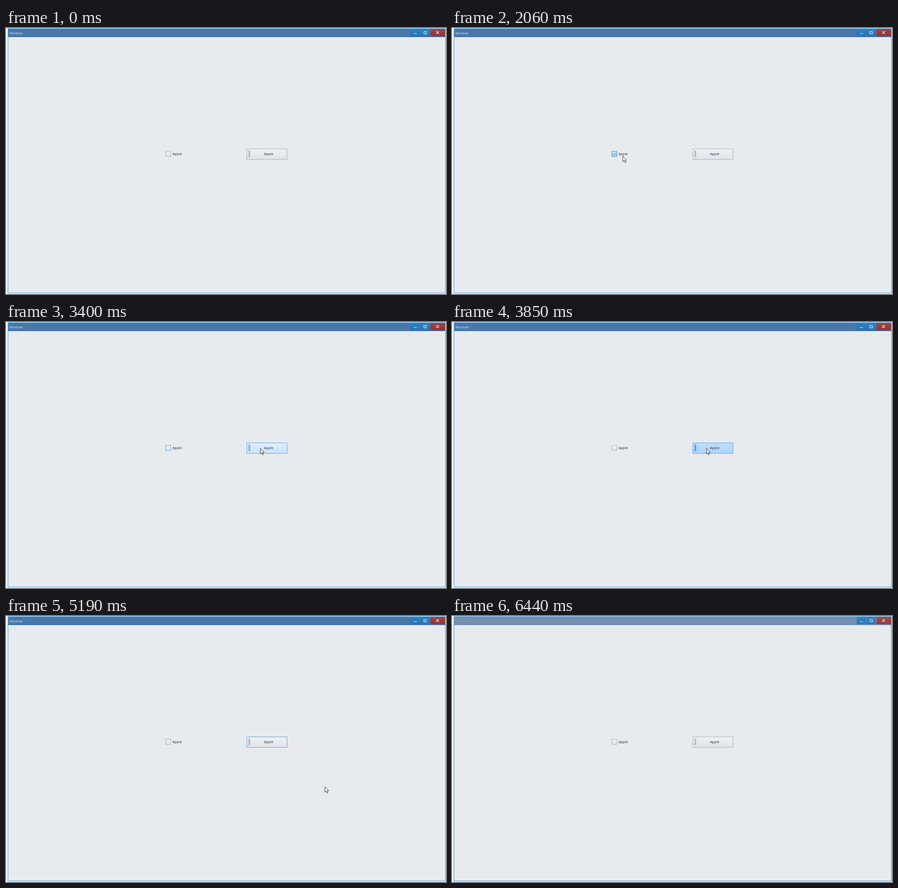
An HTML page that plays this animation: 962x582 px, repeating every 6520 ms.

```html
<!DOCTYPE html>
<html lang="en">
<head>
<meta charset="utf-8">
<title>Window</title>
<style>
  html, body { margin: 0; width: 100%; height: 100%; overflow: hidden; background: #fff; }
  svg { display: block; width: 100vw; height: 100vh; }
  text { font: 7.7px "Open Sans", "Noto Sans", sans-serif; fill: #1f2340; }
</style>
</head>
<body>
<svg viewBox="0 0 962 582" preserveAspectRatio="none">
  <defs>
    <linearGradient id="blue" x2="0" y2="1"><stop stop-color="#2b83c6"/><stop offset="1" stop-color="#2274b8"/></linearGradient>
    <linearGradient id="red" x2="0" y2="1"><stop stop-color="#a74343"/><stop offset="1" stop-color="#923232"/></linearGradient>
    <linearGradient id="boxFill" x2="0" y2="1"><stop/><stop offset="1"/></linearGradient>
    <linearGradient id="buttonFill" x2="0" y2="1"><stop/><stop offset="1"/></linearGradient>
  </defs>

  <g fill="none">
    <rect x="2.5" y="-.5" width="960" height="582" stroke="#edf7fd"/>
    <rect x="3.5" y=".5" width="958" height="580" stroke="#c2e2f7"/>
  </g>
  <rect x="4" y="1" width="957" height="579" fill="#e7ebee"/>
  <rect id="bar" x="4" y="1" width="957" height="19"/>
  <text id="title" x="7.5" y="13.8">Window</text>

  <g id="controls">
    <rect x="885" y="2" width="20.5" height="16" fill="url(#blue)"/>
    <rect x="906.5" y="2" width="20.5" height="16" fill="url(#blue)"/>
    <rect x="928" y="2" width="32" height="16" fill="url(#red)"/>
    <g fill="none" stroke="#e3eef8" stroke-width="1.2">
      <path d="M892 12.4h6.5"/>
      <rect x="913.6" y="7.8" width="5.6" height="5"/>
      <path d="M940.4 7l6.2 6m0-6l-6.2 6"/>
    </g>
  </g>
  <rect id="frame" x="4.5" y="1.5" width="956" height="578" fill="none"/>

  <rect id="box" x="349.5" y="270" width="11" height="11" fill="url(#boxFill)"/>
  <path id="tick" d="M352 275.3l2.4 2.5 4.4-4.7" fill="none" stroke="#182a4e" stroke-width="1.5"/>
  <text x="364" y="278.3">Apple</text>

  <rect id="button" x="526.5" y="264.5" width="88" height="23" fill="url(#buttonFill)"/>
  <rect id="marker" x="530" y="268" width="4" height="15"/>
  <text x="574.2" y="278.3" text-anchor="middle">Apple</text>

  <circle id="press" r="8" fill="#f3f13a" fill-opacity=".78"/>
  <path id="cursor" d="M.4.5V12.6L3.1 10l2 4.4 1.9-.8-1.9-4.3H8.6Z" fill="#fff" stroke="#111" stroke-width=".85"/>
</svg>
<script>
const LOOP = 6520;
const $ = id => document.getElementById(id);
const set = (el, attrs) => { for (const k in attrs) el.setAttribute(k, attrs[k]); };
const within = (t, from, to) => t >= from && t < to;
const clamp = v => Math.max(0, Math.min(1, v));
const ease = v => v * v * (3 - 2 * v);

const rgb = hex => [1, 3, 5].map(i => parseInt(hex.slice(i, i + 2), 16));
const mix = (a, b, k) => {
  const to = rgb(b);
  return `rgb(${rgb(a).map((v, i) => Math.round(v + (to[i] - v) * k))})`;
};

// Blend the colour lists of the two keys around t.
function shade(keys, t) {
  let i = 0;
  while (i < keys.length - 1 && keys[i + 1][0] <= t) i++;
  const [t0, from] = keys[i];
  const [t1, to] = keys[i + 1] || [LOOP, from];
  const k = clamp((t - t0) / (t1 - t0));
  return from.map((c, n) => mix(c, to[n], k));
}

// Each state: top fill, bottom fill, border, marker
const idleBox = ['#f2f4f5', '#dfe5e9', '#a2abb3'];
const hoverBox = ['#d9ecfe', '#b7dbfb', '#5b9fda'];
const downBox = ['#cde5fc', '#a3cff8', '#3978b7'];
const leftBox = ['#f2f4f5', '#dfe5e9', '#5b9fda'];
const boxKeys = [
  [0, idleBox], [1110, idleBox], [1430, hoverBox],
  [1660, hoverBox], [1980, downBox], [2300, hoverBox],
  [2380, hoverBox], [2700, downBox], [2780, downBox],
  [3000, hoverBox], [3320, leftBox], [3420, leftBox], [3670, idleBox]
];

const idle = ['#eff1f3', '#dfe4e8', '#a4adb5', '#b2bfca'];
const hover = ['#deeeff', '#c8e3fe', '#5b9fdf', '#80b5e7'];
const down = ['#bfddff', '#aed5ff', '#5b9fdf', '#5da5e9'];
const on = ['#cae4ff', '#b7daff', '#5b9fdf', '#5da5e9'];
const focus = ['#eff1f3', '#dfe4e8', '#5b9fdf', '#b8bcc0'];
const buttonKeys = [
  [0, idle], [3160, idle], [3420, hover], [3670, down],
  [3850, down], [4090, on], [4410, on], [4490, down], [4560, down],
  [4630, hover], [4870, hover], [5190, focus], [6270, focus], [6440, idle]
];

// The pointer jumps from stop to stop.
const stops = [
  [560, 954, 538], [640, 735, 487], [720, 523, 417],
  [950, 462, 362], [1030, 395, 300], [1110, 373, 280],
  [3000, 508, 278], [3080, 545, 276], [3160, 556, 276],
  [4870, 602, 305], [4950, 672, 356], [5020, 697, 373]
];

function pointer(t) {
  if (t < 560 || t >= 6030) return null;
  if (t >= 5330) {
    const k = ease(Math.min(9, Math.floor((t - 5330) / 77.5) + 1) / 9);
    return [697 + 210 * k, 373 + 200 * k];
  }
  return stops.filter(s => s[0] <= t).pop().slice(1);
}

const presses = [[1660, 1980], [2380, 2780], [3420, 3780], [4410, 4560]];

function paint(fillId, el, [top, bottom, border]) {
  const [a, b] = $(fillId).children;
  set(a, { 'stop-color': top });
  set(b, { 'stop-color': bottom });
  set(el, { stroke: border });
}

function render(t) {
  const fade = t < 6350 ? 0 : t < 6440 ? 0.5 : 1;
  set($('bar'), { fill: mix('#4977a9', '#7190b2', fade) });
  $('title').style.fill = mix('#d9e2ec', '#8597b2', fade);
  set($('controls'), { opacity: 1 - 0.12 * fade });
  set($('frame'), { stroke: mix('#5ba9dd', '#5796c5', fade) });

  paint('boxFill', $('box'), shade(boxKeys, t));
  set($('tick'), { opacity: clamp((t - 1980) / 240) * (1 - clamp((t - 2780) / 200)) });

  const look = shade(buttonKeys, t);
  paint('buttonFill', $('button'), look);
  set($('marker'), { fill: look[3] });

  const at = pointer(t);
  $('cursor').style.display = at ? '' : 'none';
  const pressed = at && presses.some(([from, to]) => within(t, from, to));
  $('press').style.display = pressed ? '' : 'none';
  if (at) {
    set($('cursor'), { transform: `translate(${at})` });
    set($('press'), { cx: at[0], cy: at[1] + 1 });
  }
}

const start = performance.now();
function tick() {
  render((performance.now() - start) % LOOP);
  requestAnimationFrame(tick);
}
tick();
</script>
</body>
</html>
```
